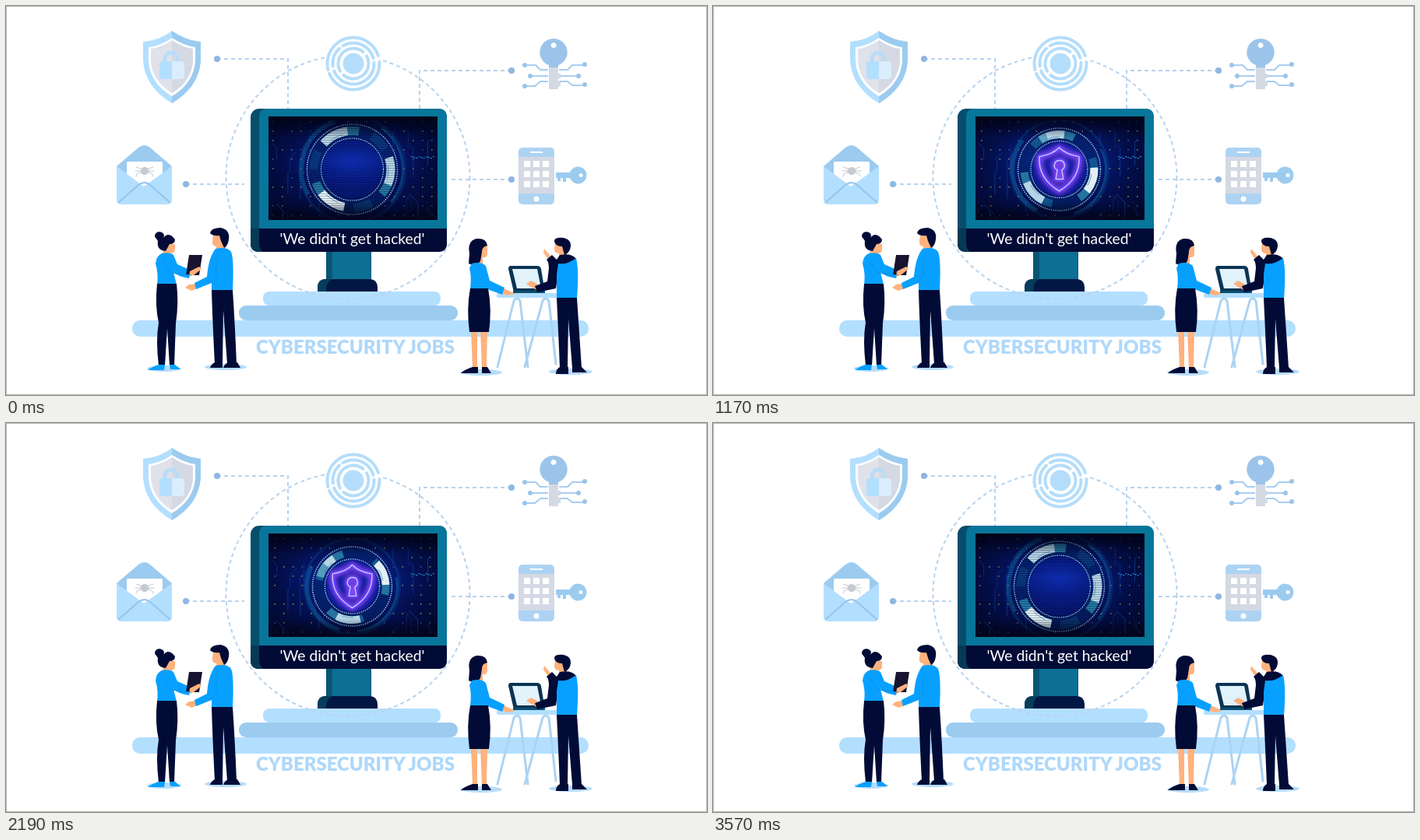
Write an HTML page with a canvas that moves like this. It is 900 px wide and 500 px high and loops after 3600 ms.

```html
<!DOCTYPE html>
<html lang="en">
<head>
<meta charset="utf-8">
<title>Cybersecurity jobs</title>
<style>
  html, body { margin: 0; width: 100%; height: 100%; overflow: hidden; background: #fff; }
  svg, canvas { position: absolute; left: 0; top: 0; }
  canvas { left: 337px; top: 142px; }
  text { font-family: Lato, sans-serif; text-anchor: middle; }
  .line { fill: none; stroke-linecap: round; stroke-linejoin: round; }
  .dash { fill: none; stroke: #b8d3ee; stroke-width: 2; stroke-dasharray: 5 4; }
  .shirt { fill: #08a0ff; } .navy { fill: #020b36; } .skin { fill: #ffb27d; }
  .pale { fill: #b3dfff; } .mid { fill: #9ccbf0; } .grey { fill: #d4d9e4; } .white { fill: #fff; }
</style>
</head>
<body>
<svg width="900" height="500" viewBox="0 0 900 500">
  <rect x=".5" y=".5" width="899" height="499" fill="#fff" stroke="#b5b5b5"/>

  <!-- plinth and connectors -->
  <rect class="pale" x="162" y="404" width="586" height="21" rx="10"/>
  <rect class="mid" x="299" y="385" width="281" height="19" rx="9"/>
  <rect class="pale" x="330" y="367" width="228" height="18" rx="8"/>
  <circle class="dash" cx="439" cy="220" r="156.500"/>
  <path class="dash" d="M271 68H362V132M649 83H531V132M231 229H306M649 223H572"/>
  <g fill="#8fb7e2">
    <circle cx="271" cy="68" r="4"/><circle cx="649" cy="83" r="4"/>
    <circle cx="231" cy="229" r="4"/><circle cx="649" cy="223" r="4"/>
  </g>

  <!-- shield -->
  <path class="pale" d="M213 32Q230 44 250 46V70Q248 104 213 125Q178 104 176 70V46Q198 44 213 32Z"/>
  <path class="mid" d="M213 32Q230 44 250 46V70Q248 104 213 125Z"/>
  <path class="white" d="M213 41Q229 51 243 53V71Q241 99 213 116Q185 99 183 71V53Q199 51 213 41Z"/>
  <path fill="#dfe2ea" d="M213 44Q228 54 240 55V71Q238 97 213 112Q188 97 186 71V55Q200 53 213 44Z"/>
  <path class="grey" d="M213 44Q228 54 240 55V71Q238 97 213 112Z"/>
  <path class="line" d="M204 73V68A8 8 0 0 1 220 68V73" stroke="#b9dcf7" stroke-width="5"/>
  <rect class="pale" x="197" y="71" width="32" height="23" rx="4"/>
  <path fill="#f3f6fb" d="M213 71H225Q229 71 229 75V90Q229 94 225 94H213Z" opacity=".6"/>

  <!-- labyrinth -->
  <circle class="white" cx="446" cy="74" r="37"/>
  <g class="line" stroke="#b4ddfb" stroke-width="4" transform="translate(446 74)">
    <circle r="33.500" stroke-dasharray="92 5 103 8"/>
    <circle r="26.500" stroke-dasharray="48 6 25 6" transform="rotate(55)"/>
    <circle r="19.500" stroke-dasharray="54 7" transform="rotate(150)"/>
    <circle r="11" stroke-width="5" fill="#b4ddfb"/>
  </g>

  <!-- circuit key -->
  <g class="line" stroke="#a9cdf0" stroke-width="2.200">
    <path d="M666 76H680L686 82H695M672 90H695M666 103H679L686 97H695M741 76H727L721 82H711M735 90H711M741 102H727L721 97H711"/>
  </g>
  <g fill="#9cc4ea">
    <circle cx="666" cy="76" r="3"/><circle cx="673" cy="90" r="3"/><circle cx="666" cy="103" r="3"/>
    <circle cx="743" cy="75" r="3"/><circle cx="735" cy="90" r="3"/><circle cx="743" cy="101" r="3"/>
    <path fill-rule="evenodd" d="M703 42A17.500 17.500 0 0 1 709 76V106H697V76A17.500 17.500 0 0 1 703 42ZM703 47A3.500 3.500 0 1 0 703.100 47Z"/>
  </g>
  <path class="grey" d="M697 79H709V87H712V93H709V97H712V103H709V107H697Z"/>

  <!-- envelope -->
  <path class="mid" d="M142 206L170 182Q178 176 185 182L213 206V225H142Z"/>
  <rect class="white" x="155" y="200" width="46" height="35" rx="2"/>
  <g stroke="#c5c9d2" fill="#c5c9d2"><ellipse cx="178" cy="212" rx="5" ry="4.500"/>
    <path class="line" d="M167 207L173 209L188 216L189 219M189 207L183 209L168 216L167 219M166 212H190"/></g>
  <path class="pale" d="M142 206L177 232L213 206V249Q213 255 207 255H148Q142 255 142 249Z"/>
  <path class="line" d="M145 252L170 230Q178 224 185 230L210 252" stroke="#93c4ec" stroke-width="2"/>

  <!-- phone -->
  <rect fill="#add3f3" x="658" y="182" width="46" height="73" rx="5"/>
  <rect class="grey" x="658" y="194" width="46" height="47"/>
  <path d="M673 188H689" stroke="#fff" stroke-width="2"/>
  <circle class="white" cx="681" cy="248" r="3.500"/>
  <g stroke="#fff" stroke-width="8" stroke-dasharray="8 4"><path d="M665 203H698M665 216H698M665 229H698"/></g>
  <path class="mid" fill-rule="evenodd" d="M706 214H724A11 11 0 1 1 724 221H719V226H715V221H712V225H708V221H706ZM738 215A2.500 2.500 0 1 0 738.100 215Z"/>

  <!-- monitor -->
  <rect fill="#085675" x="411" y="314" width="58" height="40"/>
  <rect fill="#0b7093" x="419" y="314" width="49" height="40"/>
  <path fill="#021744" d="M400 367V361Q401 351 410 351H467Q476 351 477 361V367Z"/>
  <path fill="#063d5c" d="M400 367V361Q401 351 410 351H420Q411 353 411 367Z"/>
  <rect fill="#064e6c" x="314" y="132" width="252" height="184" rx="11"/>
  <path fill="#08759a" d="M336 132H555Q566 132 566 143V290H325V143Q325 132 336 132Z"/>
  <path class="navy" d="M314 286H566V305Q566 316 555 316H325Q314 316 314 305Z"/>
  <path fill="#063955" d="M314 286H325V305Q325 312 330 316H325Q314 316 314 305Z"/>
  <text x="444.500" y="306" font-size="19.300" fill="#fff">'We didn't get hacked'</text>
  <text x="448.500" y="447" font-size="24" font-weight="900" fill="#aed8fa">CYBERSECURITY JOBS</text>

  <!-- woman with tablet -->
  <g fill="#b5dcfa"><ellipse cx="203" cy="466" rx="22" ry="4"/><ellipse cx="282" cy="464" rx="27" ry="4"/>
    <ellipse cx="610" cy="471" rx="27" ry="4"/><ellipse cx="725" cy="470" rx="28" ry="4"/></g>
  <path class="skin" d="M202 306H217V314Q216 318 211 318V325H201Z"/>
  <path class="navy" d="M193 299A6 5 0 1 1 202 298Q209 289 217 300Q217 306 210 306L205 315Q193 314 195 302Z"/>
  <path class="shirt" d="M200 318Q210 316 215 320L220 332L238 340L235 350Q219 347 215 342L219 358H194Q196 345 192 331Q193 321 200 318Z"/>
  <path class="navy" d="M194 357H219Q222 381 218 408L216 462H210L207 414L204 462H196Q192 429 196 407Q191 385 194 357Z"/>
  <path class="shirt" d="M196 461H204L203 468H182Q187 464 196 461ZM210 461H217L224 467H211Z"/>
  <path fill="#17142f" d="M235 320H252L248 346H231Z"/>
  <path class="skin" d="M236 341L248 335L251 338L241 346L235 348Z"/>
  <path d="M201 328L212 343L237 346" class="line" stroke="#0790e8"/>

  <!-- man opposite -->
  <path class="skin" d="M266 294H282V314H270V309Q264 309 265 302ZM245 357L235 358L230 362L238 366L246 363Z"/>
  <path class="navy" d="M262 292Q263 285 276 285Q288 288 286 300Q285 308 280 311L276 302L274 295Q266 296 262 292Z"/>
  <path class="shirt" d="M269 312Q284 309 289 316Q293 325 291 366H264V356L244 364L242 356L258 348Q260 323 269 312Z"/>
  <path d="M270 325L270 348L262 356" class="line" stroke="#0790e8"/>
  <path class="navy" d="M264 365H291Q294 410 296 460H284L279 391L278 460H268Q265 402 264 365ZM268 458H278V465H262Q263 461 268 458ZM285 458H297L301 465H279Q280 461 285 458Z"/>

  <!-- desk and woman -->
  <path d="M631 464L652 379Q656 373 660 379L670 464M666 464L689 379Q693 373 697 379L706 460" class="line" stroke="#acd3f3" stroke-width="3"/>
  <rect class="pale" x="630" y="369" width="78" height="6" rx="2"/>
  <path class="skin" d="M606 307H618V319Q617 324 612 323V334H602ZM597 416H605L605 467H599ZM609 416H618L617 467H611ZM637 362L648 367L654 370L644 372L635 369Z"/>
  <path class="navy" d="M595 318Q592 302 604 299Q617 298 618 308Q611 309 611 316Q610 323 609 328Q603 336 594 331Z"/>
  <path class="shirt" d="M598 331Q610 328 616 334L621 353L640 362L637 371L618 364H596Q598 348 595 337Z"/>
  <path class="navy" d="M596 363H619Q624 390 620 419H595Q591 389 596 363ZM599 464H606V472H584Q589 467 599 464ZM611 464H618L623 472H611Z"/>
  <path fill="#0b3453" d="M648 334H682Q686 334 687 338L692 368H652L645 338Q645 334 648 334Z"/>
  <path fill="#e2f2fb" d="M650 338H682L687 363H656Z"/>
  <path fill="#0a5070" d="M651 366H692V369H651Z"/>

  <!-- man pointing -->
  <path class="skin" d="M705 305H720V322H710V318Q704 318 704 312ZM702 326L697 319L691 312L690 317L695 324L699 330ZM682 357L674 353L668 357L674 361L681 365Z"/>
  <path class="navy" d="M704 303Q703 297 716 298Q728 301 724 313Q722 318 717 320L714 309Q706 309 704 303Z"/>
  <path class="navy" d="M711 320Q726 317 732 325L727 335L709 342L706 363L682 368L679 360L695 354L697 337Q697 329 694 326L701 320L707 326Z"/>
  <path class="shirt" d="M709 331Q720 333 732 324Q736 340 733 376H707V345Z"/>
  <path class="navy" d="M707 375H733Q736 420 739 465H727L722 402L721 465H711Q709 415 707 375ZM711 464H722V473H706Q706 467 711 464ZM727 464H739L746 471H727Z"/>
</svg>
<canvas id="screen" width="217" height="133"></canvas>
<script>
const W = 217, H = 133, CX = 107.5, CY = 68, LOOP = 3600, STEP = 30;
const g = document.getElementById('screen').getContext('2d');
const rad = deg => deg * Math.PI / 180;
const clamp = x => Math.max(0, Math.min(1, x));
const smooth = (a, b, x) => { x = clamp((x - a) / (b - a)); return x * x * (3 - 2 * x); };

function seeded(seed) {
  return () => (seed = seed * 16807 % 2147483647) / 2147483647;
}

function arc(r, from, to, width, color, dash = []) {
  g.beginPath();
  g.arc(CX, CY, r, rad(from), rad(to));
  g.lineWidth = width;
  g.strokeStyle = color;
  g.setLineDash(dash);
  g.stroke();
  g.setLineDash([]);
}

function glow(x, y, rx, ry, color) {
  g.save();
  g.translate(x, y);
  g.scale(rx, ry);
  const fill = g.createRadialGradient(0, 0, 0, 0, 0, 1);
  fill.addColorStop(0, color);
  fill.addColorStop(1, 'rgba(0,20,120,0)');
  g.fillStyle = fill;
  g.fillRect(-1, -1, 2, 2);
  g.restore();
}

function backdrop(u) {
  const rnd = seeded(71);
  g.fillStyle = '#03092f';
  g.fillRect(0, 0, W, H);
  glow(CX, 62, 135, 85, '#0a28a0');
  glow(CX, 56, 100, 32, `rgba(20,65,220,${.55 - .3 * u})`);

  for (let i = 0; i < 24; i++) {
    const x = i % 2 ? rnd() * 65 : W - rnd() * 65, y = rnd() * H;
    const bend = (rnd() - .5) * 26, len = 12 + rnd() * 28;
    g.strokeStyle = `rgba(35,105,220,${.25 + rnd() * .35})`;
    g.lineWidth = .8;
    g.beginPath();
    g.moveTo(x, y);
    g.lineTo(x + bend, y + Math.abs(bend));
    g.lineTo(x + bend, y + Math.abs(bend) + len);
    g.stroke();
  }
  for (let y = 6; y < H; y += 12)
    for (let x = 5; x < W; x += 12) {
      const shown = rnd();
      if (Math.hypot(x - CX, y - CY) < 58 || shown < .4) continue;
      g.fillStyle = shown > .65 ? '#8d8a48' : '#32609d';
      g.fillRect(x + (CX - x) * .03 * u, y, 1.6, 1.6);
    }
  g.fillStyle = '#2c8ed5';
  for (let i = 0; i < 10; i++) g.fillRect(183 + i * 3.1, 51 + i % 3, 2, 1.3);
}

function rings(ms, u) {
  const scale = 1 - .21 * u * u;
  const spin = -54 * (ms / 840) ** 2;
  const r = 57 * scale, inner = 40 * scale;
  arc(r + 11, 0, 360, 3, 'rgba(18,105,180,.23)');
  arc(r + 8, 150 + spin * .3, 250 + spin * .3, 5, 'rgba(20,125,180,.42)');
  arc(r + 8, -55 - spin * .3, 40 - spin * .3, 3, 'rgba(20,125,180,.42)');
  arc((r + inner) / 2, 0, 360, r - inner, 'rgba(5,38,105,.5)');
  const band = 11 * scale, mid = r - band / 2 - 2;
  for (let k = 0; k < 3; k++) {
    const a = k * 120 + spin;
    arc(mid, a - 17, a + 40, band, '#24749f');
    arc(mid, a - 18, a + 23, band, k === 1 ? '#e1eff4' : '#b6d4e4');
    arc(mid - 3, a - 7, a + 15, 1, '#67a0be');
    arc(mid, a + 60 - spin * .25, a + 88 - spin * .25, band, `rgba(28,123,164,${.25 + .5 * u})`);
  }
  arc(r + 1, 0, 360, 1.5, '#a7d8ed', [1.4, 1.4]);
  arc(inner, 0, 360, 1.2, '#a2d8f3', [1.6, 1.2]);
  g.beginPath();
  g.arc(CX, CY, inner - 2, 0, 7);
  g.fillStyle = `rgba(18,30,165,${.2 + .6 * smooth(.2, .75, u)})`;
  g.fill();
}

const shieldPath = new Path2D('M107.500 39Q116 48 134 51Q136 80 107.500 97Q79 80 81 51Q99 48 107.500 39Z');
const keyholePath = new Path2D('M105 69C98 65 101 56 108 56C115 56 117 65 111 69L113 81H103Z');

function neon(path, pieces, length, drawn) {
  const piece = length / pieces;
  g.setLineDash(drawn < 1 ? [piece * drawn, piece * (1 - drawn)] : []);
  for (const [width, color] of [[7, 'rgba(65,45,255,.35)'], [4, '#5145ff'], [1.5, '#d0c3ff']]) {
    g.lineWidth = width;
    g.strokeStyle = color;
    g.stroke(path);
  }
  g.setLineDash([]);
}

function emblem(ms, u) {
  const drawn = smooth(280, 800, ms);
  if (!drawn) return;
  const size = 1.02 - .09 * u;
  g.save();
  g.translate(CX, CY);
  g.scale(size, size);
  g.translate(-CX, -CY);
  g.globalAlpha = Math.min(1, drawn * 2);
  g.shadowColor = u > .6 ? '#b050ff' : '#3f50ff';
  g.shadowBlur = 7;
  g.lineJoin = 'round';
  neon(shieldPath, 9, 178, drawn);
  g.scale(1, 1);
  neon(keyholePath, 4, 68, drawn);
  g.restore();
}

function shade(u) {
  g.fillStyle = `rgba(0,0,25,${.24 * (1 - smooth(.25, .5, u))})`;
  for (let y = 0; y < H; y += 3) g.fillRect(0, y, W, 1);
  const edge = g.createLinearGradient(0, 0, 0, H);
  edge.addColorStop(0, 'rgba(0,2,18,.85)');
  edge.addColorStop(.2, 'rgba(0,2,18,0)');
  edge.addColorStop(.82, 'rgba(0,2,18,0)');
  edge.addColorStop(1, 'rgba(0,2,18,.75)');
  g.fillStyle = edge;
  g.fillRect(0, 0, W, H);
}

const start = performance.now();
function draw(now) {
  const t = Math.floor(Math.max(0, now - start) % LOOP / STEP) * STEP;
  const ms = Math.min(t, LOOP - STEP - t); // plays forwards, then back
  const u = ms / (LOOP / 2);
  backdrop(u);
  rings(ms, u);
  emblem(ms, u);
  shade(u);
  requestAnimationFrame(draw);
}
draw(start);
</script>
</body>
</html>
```
